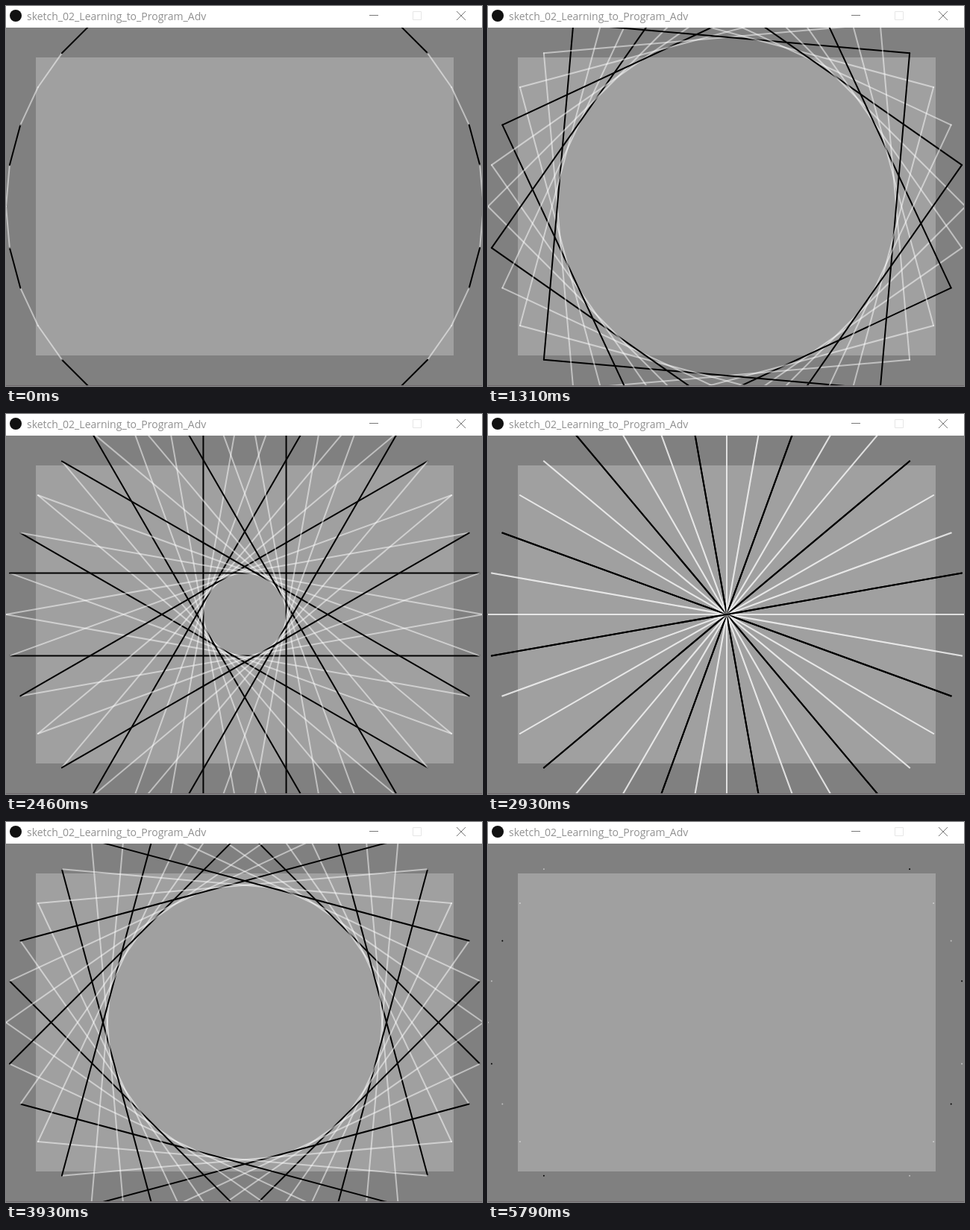
These frames come from a looping animation (638x510 px, 5.94 s). An HTML page:

```html
<!DOCTYPE html>
<html lang="en">
<head>
<meta charset="utf-8">
<title>Rotating chords</title>
<style>
  html, body { margin: 0; width: 100%; height: 100%; overflow: hidden; background: #808080; }
  svg { display: block; }
  text { font: 14px "Open Sans", "Noto Sans", sans-serif; fill: #909090; }
</style>
</head>
<body>
<svg width="638" height="510" viewBox="0 0 638 510">
  <rect y="29" width="638" height="481" fill="#808080"/>
  <rect x="40" y="69" width="560" height="400" fill="#a0a0a0"/>
  <g id="chords" stroke-width="2" stroke-linecap="round"></g>
  <rect y="509" width="638" height="1" fill="#706a6e"/>
  <rect width="638" height="29" fill="#fff"/>
  <circle cx="13" cy="13" r="8" fill="#111"/>
  <text x="28" y="19">sketch_02_Learning_to_Program_Adv</text>
  <g fill="none" stroke="#777">
    <path d="M487 12.5h12"/>
    <path d="M545.5 7.5h11v11h-11z" stroke="#e6e6e6"/>
    <path d="M604 7l12 12M616 7l-12 12"/>
  </g>
</svg>
<script>
  const COUNT = 36, RADIUS = 320, CX = 320, CY = 269, LOOP = 5940;

  // [step, start time in ms]; steps between two entries are evenly spaced
  const timing = [[0, 0], [1, 140], [7, 1150], [8, 1310], [9, 1460], [14, 2310],
    [15, 2460], [16, 2620], [20, 3310], [21, 3470], [22, 3620], [24, 3930],
    [25, 4090], [28, 4630], [29, 4790], [35, 5790], [36, LOOP]];

  const group = document.getElementById('chords');
  const lines = Array.from({ length: COUNT }, () =>
    group.appendChild(document.createElementNS('http://www.w3.org/2000/svg', 'line')));

  function setAttrs(el, attrs) {
    for (const name in attrs) el.setAttribute(name, attrs[name]);
  }

  function point(i) {
    const a = (i % COUNT) * 2 * Math.PI / COUNT;
    return [CX + RADIUS * Math.cos(a), CY + RADIUS * Math.sin(a)];
  }

  function stepAt(t) {
    const n = timing.findIndex(([, start]) => start > t);
    const [s0, t0] = timing[n - 1], [s1, t1] = timing[n];
    return Math.floor(s0 + (s1 - s0) * (t - t0) / (t1 - t0) + 1e-6);
  }

  // Join each point to the one `skip` places on; every third chord is black.
  function draw(skip) {
    lines.forEach((line, i) => {
      const [x1, y1] = point(i), [x2, y2] = point(i + skip);
      const black = (i + skip) % 3 === 2;
      setAttrs(line, { x1, y1, x2, y2,
        stroke: black ? '#000' : '#fff', 'stroke-opacity': black ? 1 : 0.5 });
    });
  }

  let shown = -1;
  function tick() {
    const step = stepAt(performance.now() % LOOP);
    if (step !== shown) draw((shown = step) + 1);
    requestAnimationFrame(tick);
  }
  tick();
</script>
</body>
</html>
```
